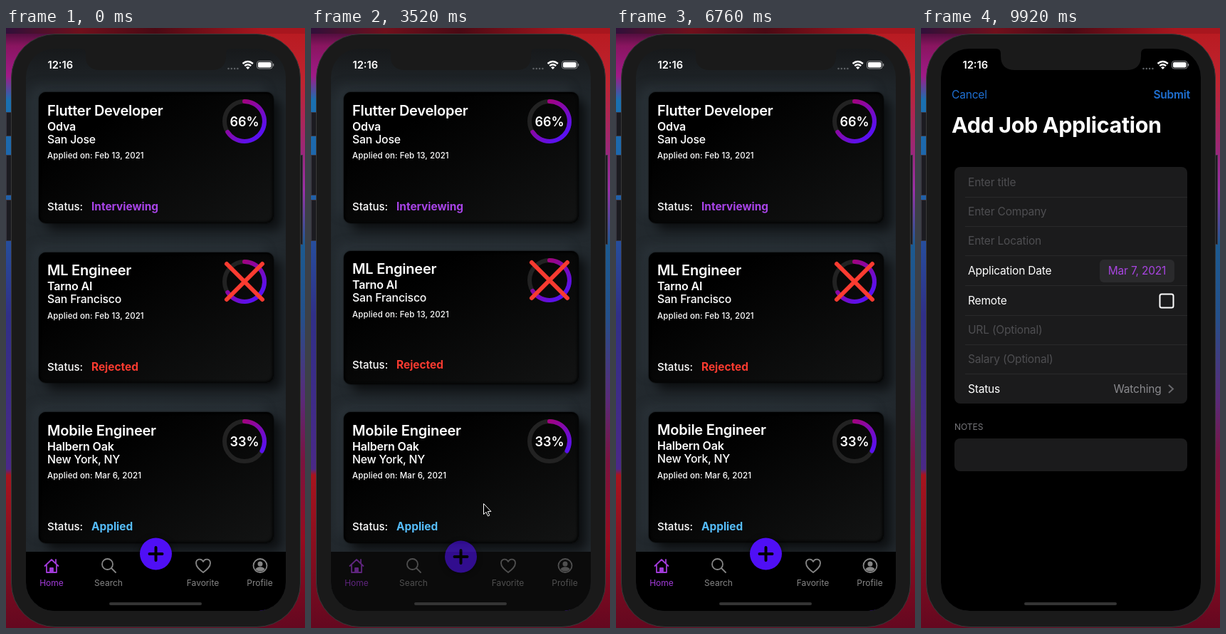
An HTML page that plays this animation: 420 by 842 pixels, repeating every 9960 ms.

```html
<!DOCTYPE html>
<html lang="en">
<head>
<meta charset="utf-8">
<title>Job applications</title>
<style>
html, body { margin: 0; width: 100%; height: 100%; overflow: hidden; }
body {
  position: relative;
  font-family: Inter, Roboto, sans-serif;
  color: #fff;
  background:
    linear-gradient(90deg, #30103a, #70101c 25%, #4a0a14 50%, #a8161e 85%) 0 0 / 100% 8px no-repeat,
    linear-gradient(#3a0c30, #8a1560 3%, #a01a88 8%, #1a70b0 12%, #2060a8 28%, #302f88 48%, #4a2888 73.5%, #a8141e 74.5%, #640820) 0 0 / 50% 100% no-repeat,
    linear-gradient(#b81a20, #c02430 9%, #98287c 21%, #9a30a8 27%, #1c5a90 36%, #24508a 48%, #5a2a78 62%, #7a1440 72%, #960c20 85%, #640820) 100% 0 / 50% 100% no-repeat;
}
div, svg, span { position: absolute; }
svg { overflow: visible; }
span { white-space: nowrap; line-height: 20px; margin-top: -10px; letter-spacing: -.012em; }
.key { background: #1b1b20; box-shadow: 0 0 0 1px #3a3540; }
#phone {
  left: 7px; top: 8px; width: 407px; height: 833px; box-sizing: border-box;
  border-radius: 62px; background: #1a1a1a; border: 1px solid #393939;
}
#screen {
  left: 28px; top: 29px; width: 365px; height: 789px; overflow: hidden; border-radius: 40px;
  background: linear-gradient(#17191b, #22292e 75px, #22282d);
}
.stage { left: 0; top: 0; width: 420px; height: 842px; }
#screen > .stage { left: -28px; top: -29px; }
#list { z-index: 0; }
#list ~ * { z-index: 1; }
.card {
  border-radius: 10px; background: #30363b;
  box-shadow: 0 0 2px #000, 11px 10px 15px rgba(0,0,0,.62), -10px -10px 15px rgba(62,74,82,.25);
}
.face {
  inset: 0; border-radius: 10px;
  background: linear-gradient(150deg, #000 25%, #131414);
  box-shadow: inset -2px -2px 3px #050606, inset 2px 2px 3px #000;
}
.card span { left: 12px; }
.title { top: 25.5px; font-size: 20px; font-weight: 600; }
.firm { top: 47.5px; font-size: 16px; font-weight: 600; }
.place { top: 66.5px; font-size: 15.8px; font-weight: 500; }
.date { font-size: 11.5px; font-weight: 500; letter-spacing: .1px; }
.status { font-size: 15px; font-weight: 500; letter-spacing: 0; }
.card .state { left: 74px; font-size: 15.4px; font-weight: 700; letter-spacing: 0; }
.ring { right: 10px; top: 10px; width: 62px; height: 62px; }
#bar { left: 28px; top: 735px; width: 365px; height: 83px; }
.tab { top: 779px; width: 80px; text-align: center; font-size: 12px; letter-spacing: 0; color: #858585; }
#sheet { background: #000; top: 29px; }
#form { top: -29px; font-size: 15.5px; }
.box { left: 47px; width: 327px; border-radius: 8px; background: #1b1b1c; }
.hint { color: #4e4e51; }
.line { left: 62px; width: 312px; height: 1px; background: #29292a; }
</style>
</head>
<body>
<div class="key" style="left:1px;top:119px;width:8px;height:32px"></div>
<div class="key" style="left:1px;top:179px;width:8px;height:55px"></div>
<div class="key" style="left:1px;top:242px;width:8px;height:56px"></div>
<div class="key" style="left:411px;top:179px;width:5px;height:124px"></div>
<div id="phone"></div>
<div id="screen">
  <div class="stage">
    <div id="list" class="stage"></div>
    <div id="bar"></div>
    <div id="tabs" class="stage">
      <span class="tab" style="left:24px;color:#a13ad8">Home</span>
      <span class="tab" style="left:104px">Search</span>
      <span class="tab" style="left:236.5px">Favorite</span>
      <span class="tab" style="left:316.5px">Profile</span>
      <svg class="stage" fill="none" stroke="#858585" stroke-width="1.8" stroke-linecap="round" stroke-linejoin="round">
        <g stroke="#a13ad8"><path d="M54.500 755L64 746l9.500 9M57 754v10h14v-10M70 746v5"/><path d="M62 758h4v6h-4z" fill="#a13ad8"/></g>
        <circle cx="142.500" cy="752.500" r="7.500"/><path d="M148 758l6 6"/>
        <path d="M277 764C271 759.500 267 756 267 751c0-6 7.500-7.500 10-2 2.500-5.500 10-4 10 2 0 5-4 8.500-10 13z"/>
        <circle cx="357" cy="754.500" r="9.500"/>
        <g fill="#858585" stroke="none"><circle cx="357" cy="752" r="3.500"/><path d="M350.500 760c1-5 12-5 13 0q-6.500 5-13 0z"/></g>
      </svg>
    </div>
    <svg id="plus" class="stage" style="filter:drop-shadow(0 2px 4px #000a)">
      <circle cx="210.500" cy="738" r="22.500" fill="#4f0ff5"/>
      <path d="M201.500 738h18M210.500 729v18" stroke="#000" stroke-width="4" stroke-linecap="round"/>
    </svg>
    <svg id="tools" class="stage" fill="none" stroke="#0c0c0c" stroke-linecap="round" stroke-linejoin="round" style="filter:drop-shadow(2px 3px 3px #000a)">
      <g fill="#ff9a0f" stroke="none"><circle cx="93" cy="710" r="22.500"/><circle cx="210.500" cy="710" r="22.500"/><circle cx="328" cy="710" r="22.500"/></g>
      <path d="M82 702h22M89 701v-4h8v4M84.500 703l1.500 19h14l1.500-19M89.500 707l.5 11M93 707v11M96.500 707l-.5 11" stroke-width="2.200"/>
      <path d="M202.500 702l16 16m0-16l-16 16" stroke-width="4"/>
      <path d="M322 716l11.500-11.500M336.300 701.700l.7-.7" stroke-width="4.500"/><path d="M318 720l1.500-4.500 3 3z" fill="#0c0c0c" stroke-width="1"/>
    </svg>
    <div id="sheet" class="stage"><div id="form" class="stage">
      <span style="left:43px;top:93.500px;color:#1f70d2">Cancel</span>
      <span style="right:42px;top:93.500px;color:#1f70d2;font-weight:600">Submit</span>
      <span style="left:43px;top:136px;font-size:30.500px;font-weight:700">Add Job Application</span>
      <div class="box" style="top:195px;height:332px"></div>
      <div id="rows"></div>
      <div style="left:251px;top:325px;width:105px;height:32px;border-radius:6px;background:#2a2a2c"></div>
      <span style="left:251px;width:105px;top:341px;text-align:center;color:#a844e0">Mar 7, 2021</span>
      <span style="right:82.500px;top:507px;color:#8a8a8e">Watching</span>
      <svg class="stage" fill="none" stroke-width="2"><rect x="335.500" y="373.500" width="19" height="19" rx="2.500" stroke="#fff"/><path d="M348 501l6 5.500-6 5.500" stroke="#68686c"/></svg>
      <span style="left:47px;top:559.500px;font-size:12px;letter-spacing:0;color:#77777b">NOTES</span>
      <div class="box" style="top:576px;height:46px"></div>
    </div></div>
    <div style="left:145px;top:806px;width:130px;height:4px;border-radius:2px;background:#343434"></div>
    <span style="left:58.500px;top:52px;font-size:14.700px;font-weight:600;letter-spacing:0">12:16</span>
    <svg class="stage">
      <path d="M105 29q7 0 7 7v3q0 20 20 20h157q20 0 20-20v-3q0-7 7-7z" fill="#1a1a1a"/>
      <path d="M312.500 57h13" stroke="#5c6064" stroke-width="2.600" stroke-linecap="round" stroke-dasharray="0 4.300"/>
      <g fill="none" stroke="#fff" stroke-width="2.400"><path d="M332.500 50q7.200-6 14.400 0M335.200 53.200q4.500-3.800 9 0"/></g>
      <path d="M337 55.300q2.700-2 5.400 0l-2.700 2.700z" fill="#fff"/>
      <rect x="352.500" y="46.500" width="21.500" height="10.500" rx="3" fill="none" stroke="#8a8c8e"/>
      <rect x="354" y="48" width="18.500" height="7.500" rx="1.800" fill="#fff"/>
      <path d="M375.500 50v3.500" stroke="#8a8c8e" stroke-width="1.500"/>
    </svg>
  </div>
</div>
<svg id="cursor" width="12" height="19"><path d="M.5.500v15l3.500-3.200 2.500 5.600 2.300-1-2.500-5.500h4.600z" fill="#000" stroke="#fff"/></svg>
<svg width="0" height="0"><linearGradient id="glow" gradientUnits="userSpaceOnUse" x1="15" y1="3" x2="54" y2="45"><stop stop-color="#b00068"/><stop offset="1" stop-color="#5a10f0"/></linearGradient></svg>
<script>
const LOOP = 9960;
const $ = id => document.getElementById(id);
const clamp = x => Math.max(0, Math.min(1, x));
const mix = (a, b, p) => a + (b - a) * p;
const ramp = (t, from, span) => clamp((t - from) / span);
const smooth = x => x * x * (3 - 2 * x);

// Critically damped spring from 0 to 1
const spring = ms => {
  const x = Math.max(0, ms) * 0.0114;
  return 1 - (1 + x) * Math.exp(-x);
};

const jobs = [
  ["Flutter Developer", "Odva", "San Jose", "Feb 13, 2021", "Interviewing", "#a844e8", 66],
  ["ML Engineer", "Tarno AI", "San Francisco", "Feb 13, 2021", "Rejected", "#fb3b30", 66],
  ["Mobile Engineer", "Halbern Oak", "New York, NY", "Mar 6, 2021", "Applied", "#56bdfa", 33],
  ["iOS Software Engineer", "Dovemarsh Daily", "New York, NY", "Mar 6, 2021", "Applied", "#56bdfa", 33]
];

$("list").innerHTML = jobs.map(([title, firm, place, date, state, color, done]) => `
  <div class="card"><div class="face">
    <span class="title">${title}</span>
    <span class="firm">${firm}</span>
    <span class="place">${place}</span>
    <span class="date">Applied on: ${date}</span>
    <span class="status">Status:</span>
    <span class="status state" style="color:${color}">${state}</span>
    <svg class="ring" fill="none" stroke-width="6" stroke-linecap="round">
      <circle cx="31" cy="31" r="28" stroke="#222"/>
      <path d="M31 3a28 28 0 1 1-.01 0" pathLength="100" stroke="url(#glow)" stroke-dasharray="${done} 100"/>
      ${state === "Rejected"
        ? `<path d="M6 6l50 50m0-50l-50 50" stroke="${color}"/>`
        : `<text x="31" y="37.500" text-anchor="middle" font-size="18" font-weight="600" fill="#fff" stroke="none">${done}%</text>`}
    </svg>
  </div></div>`).join("");
const cards = [...document.querySelectorAll(".card")];

const rowY = [217, 258, 299, 341, 383, 424, 465, 507];
const labels = ["Enter title", "Enter Company", "Enter Location", "Application Date", "Remote", "URL (Optional)", "Salary (Optional)", "Status"];
$("rows").innerHTML = labels.map((text, i) =>
  `<span class="${/Enter|Opt/.test(text) ? "hint" : ""}" style="left:66px;top:${rowY[i]}px">${text}</span>` +
  (i ? `<div class="line" style="top:${Math.round((rowY[i - 1] + rowY[i]) / 2) - 1}px"></div>` : "")).join("");

// Each visit: card index, opening time, closing time
const visits = [[1, 1560, 2932], [2, 4380, 5560]];
const sheetStart = 8175;

// Pointer stops: time, x, y
const path = [
  [300, 140, 782], [1300, 318, 462], [2050, 318, 462], [2750, 214, 704], [3150, 214, 704],
  [3520, 242, 667], [4650, 242, 667], [5250, 221, 702], [6100, 221, 702], [6600, 209, 740],
  [8180, 209, 740], [8420, 169, 675]
];

function pointer(t) {
  const i = path.findIndex(stop => stop[0] > t);
  if (i === 0) return path[0].slice(1);
  if (i < 0) return path.at(-1).slice(1);
  const [t0, x0, y0] = path[i - 1], [t1, x1, y1] = path[i];
  const p = smooth(ramp(t, t0, t1 - t0));
  return [mix(x0, x1, p), mix(y0, y1, p)];
}

// p drives the size, shift drives the centre
function placeCard(card, i, p, shift, blur, active) {
  const width = mix(330, 306, p), height = mix(183.5, 602.5, p);
  const middle = mix(181.75 + i * 224.5, 429.25, shift);
  Object.assign(card.style, {
    left: 211 - width / 2 + "px", top: middle - height / 2 + "px",
    width: width + "px", height: height + "px",
    zIndex: active ? 1 : 0,
    filter: !active && blur > 0.05 ? `blur(${blur}px)` : "none"
  });
  card.firstChild.style.opacity = 1 - 1.7 * p * (1 - p);
  card.querySelector(".date").style.top = mix(89, 101.5, p) + "px";
  card.querySelectorAll(".status").forEach(el => el.style.top = mix(161, 136, p) + "px");
}

function draw(t) {
  const opened = cards.map(() => 0), shifted = cards.map(() => 0);
  let tab = 1 - ramp(t, sheetStart, 150);
  let active = -1;
  for (const [i, open, close] of visits) {
    const progress = speed => spring((t - open) * speed) * (1 - spring((t - close) * speed));
    opened[i] = progress(1);
    shifted[i] = progress(2.2);
    tab *= 1 - ramp(t, open, 150) + ramp(t, close + 410, 320);
    if (t > open && t < close + 900) active = i;
  }
  const p = Math.max(...opened);
  const blur = Math.max(14 * p * p, 10 * ramp(t, sheetStart + 125, 600));
  cards.forEach((card, i) => placeCard(card, i, opened[i], shifted[i], blur, i === active));

  const shade = 26 * (1 - tab);
  $("tabs").style.opacity = $("plus").style.opacity = tab;
  $("bar").style.opacity = clamp(tab * 2);
  $("bar").style.background = `rgb(${shade}, ${shade}, ${shade})`;
  $("plus").style.transform = `translateY(${9 * (1 - tab)}px)`;
  $("tools").style.opacity = clamp((p - 0.75) * 4.5);
  $("sheet").style.transform = `translateY(${789 * (1 - spring(t - sheetStart))}px)`;

  const [x, y] = pointer(t);
  $("cursor").style.transform = `translate(${x}px, ${y}px)`;
}

function frame() {
  draw(performance.now() % LOOP);
  requestAnimationFrame(frame);
}
frame();
</script>
</body>
</html>
```
